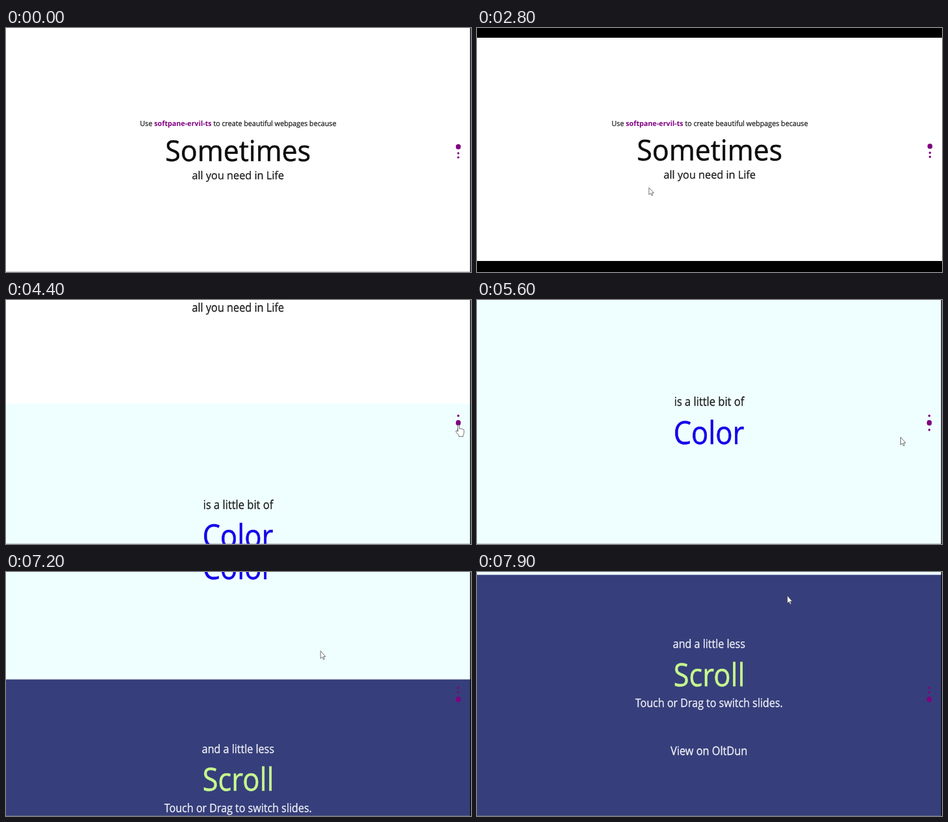
Write an HTML page that moves like this. It is 714 by 376 pixels and loops after 8000 ms.

```html
<!DOCTYPE html>
<html lang="en">
<head>
<meta charset="utf-8">
<title>Slides</title>
<style>
  html, body { margin: 0; width: 100%; height: 100%; overflow: hidden; background: #fff; }
  svg { display: block; width: 100vw; height: 100vh; }
  text {
    font-family: "Open Sans", "Noto Sans", sans-serif; text-anchor: middle;
    text-rendering: geometricPrecision;
    color: #1c1c1c; fill: currentColor; stroke: currentColor; stroke-width: .25;
  }
  .brand { font-weight: 700; color: #800080; fill: currentColor; stroke: none; }
  #slide3 text { color: #f4f4f9; }
  #slide1 .big { color: #0c0c0c; }
  #slide2 .big { color: #1300ea; }
  #slide3 .big { color: #c8fb8e; }
  .big { stroke-width: .5; }
  #dots { fill: #800080; }
  #arrow, #hand { fill: #fff; stroke: #4a4a4a; stroke-width: .8; stroke-linejoin: round; }
</style>
</head>
<body>
<svg viewBox="0 0 714 376" preserveAspectRatio="none">
  <rect width="714" height="376" fill="#fff"/>
  <g id="view">
    <g id="slide1"></g>
    <g id="slide2"><rect width="714" height="377" fill="#efffff"/></g>
    <g id="slide3"><rect width="714" height="377" fill="#363f7b"/></g>
  </g>
  <g id="dots"></g>
  <g id="edges">
    <rect y="375" width="714" height="1" fill="#888" opacity=".45"/>
    <rect x="712.6" width="1.4" height="376" fill="#0a0a0a"/>
  </g>
  <path id="bars" d="M0 0H714V15H0ZM0 359H714V376H0Z"/>
  <path id="arrow" d="M0 0V11.6L2.6 9.3 4.3 13.2 6 12.5 4.4 8.7H7.6Z"/>
  <path id="hand" d="M-1.2 .8Q0 -.8 1.2 .8V6Q2.4 5 3.6 6.2 5 5.4 6 6.8 7.8 6.2 8.2 8V12Q8 14.5 6.8 16V17.8H.4V16L-4 10.8Q-4.6 8.6-2.6 9L-1.2 10.4Z"/>
</svg>
<script>
const LOOP = 8000, STEP = 100, HEIGHT = 376;
const STRETCH = 1.093;   // page stretch once the bars are gone
const GLYPH = 1.13;      // glyph height against width on the stretched page
const FULL_VIEW_AT = 3000;
const NS = "http://www.w3.org/2000/svg";
const $ = id => document.getElementById(id);

function add(parent, tag, attrs) {
  const el = document.createElementNS(NS, tag);
  for (const key in attrs) el.setAttribute(key, attrs[key]);
  return parent.appendChild(el);
}

function line(slide, x, y, size, content, cls = "") {
  const el = add($(slide), "text", {
    class: cls, "font-size": size, transform: `translate(${x} ${y}) scale(1 ${GLYPH})`
  });
  el.innerHTML = content;
}

line("slide1", 356.5, 145, 10.72, 'Use <tspan class="brand">softpane-ervil-ts</tspan> to create beautiful webpages because');
line("slide1", 356.2, 203.2, 42.8, "Sometimes", "big");
line("slide1", 356.2, 234.3, 16.25, "all you need in Life");
line("slide2", 356.5, 162.5, 16.5, "is a little bit of");
line("slide2", 356, 221.5, 43.5, "Color", "big");
line("slide3", 356.3, 113, 16.1, "and a little less");
line("slide3", 356.6, 171.5, 43.5, "Scroll", "big");
line("slide3", 356.3, 204, 16.05, "Touch or Drag to switch slides.");
line("slide3", 356.2, 278, 16.3, "View on OltDun");

const dots = [0, 1, 2].map(() => add($("dots"), "ellipse", { cx: 694.5 }));

// Pointer path: time, x, y
const pointer = [
  [500, 25, 168], [900, 157, 113], [1100, 210, 80], [1300, 236, 58],
  [1500, 240, 62], [1800, 280, 102], [2200, 276, 205], [2800, 264, 246],
  [3000, 300, 236], [3200, 350, 220], [3600, 560, 204], [3900, 690, 194],
  [4100, 695, 192.5], [5000, 695, 192.5], [5300, 685, 205], [5600, 650.5, 211.5],
  [5900, 628, 228], [6300, 560, 278], [6700, 493, 246], [6900, 490.3, 244],
  [7000, 489, 215], [7300, 480, 75], [7500, 476.5, 36.5]
];

function pointerAt(t) {
  const next = pointer.findIndex(p => p[0] >= t);
  if (next < 0) return pointer[pointer.length - 1].slice(1);
  if (next === 0) return pointer[0].slice(1);
  const [t0, x0, y0] = pointer[next - 1], [t1, x1, y1] = pointer[next];
  const k = (t - t0) / (t1 - t0);
  return [x0 + (x1 - x0) * k, y0 + (y1 - y0) * k];
}

// cubic-bezier(.25, .1, .25, 1)
function ease(x) {
  if (x <= 0) return 0;
  if (x >= 1) return 1;
  const curve = (a, b, u) => 3 * a * u * (1 - u) ** 2 + 3 * b * u * u * (1 - u) + u ** 3;
  let lo = 0, hi = 1;
  for (let i = 0; i < 30; i++) {
    const mid = (lo + hi) / 2;
    if (curve(.25, .25, mid) < x) lo = mid; else hi = mid;
  }
  return curve(.1, 1, lo);
}

const show = (id, on) => $(id).setAttribute("display", on ? "inline" : "none");
const place = (id, x, y, sy = 1) => $(id).setAttribute("transform", `translate(${x} ${y}) scale(1 ${sy})`);

function placeDots(active) {
  let top = 174.8;
  dots.forEach((dot, i) => {
    const on = i === active, h = on ? 14.8 : 7;
    dot.setAttribute("cy", top + h / 2);
    dot.setAttribute("rx", on ? 3.8 : 1.7);
    dot.setAttribute("ry", on ? 4.3 : 1.9);
    top += h;
  });
}

function draw(t) {
  const first = ease((t - 4000) / 1200), second = ease((t - 6775) / 1310);
  const scroll = first + second;
  const full = t >= FULL_VIEW_AT, boxed = t >= 200 && !full;
  const sy = full ? 1 : 1 / STRETCH;
  const dx = boxed ? 1 : 0, dy = boxed ? -.8 : 0;

  place("view", dx, full ? 0 : 18.8 + dy, sy);
  ["slide1", "slide2", "slide3"].forEach((id, i) => {
    place(id, 0, (i - scroll) * HEIGHT);
    show(id, Math.abs(i - scroll) < 1);
  });

  place("dots", dx, full ? 0 : 16.3 + dy, sy);
  placeDots((first > .15) + (second > .15));
  show("bars", boxed);
  show("edges", !boxed);

  const [x, y] = pointerAt(t);
  const hovering = t >= 3900 && t <= 5100;
  place("arrow", x, y, full ? 1 : .93);
  place("hand", x, y);
  show("arrow", t >= 500 && !hovering);
  show("hand", hovering);
}

const start = performance.now();
function tick() {
  const t = (performance.now() - start) % LOOP;
  draw(Math.floor(t / STEP) * STEP);
  requestAnimationFrame(tick);
}
tick();
</script>
</body>
</html>
```
